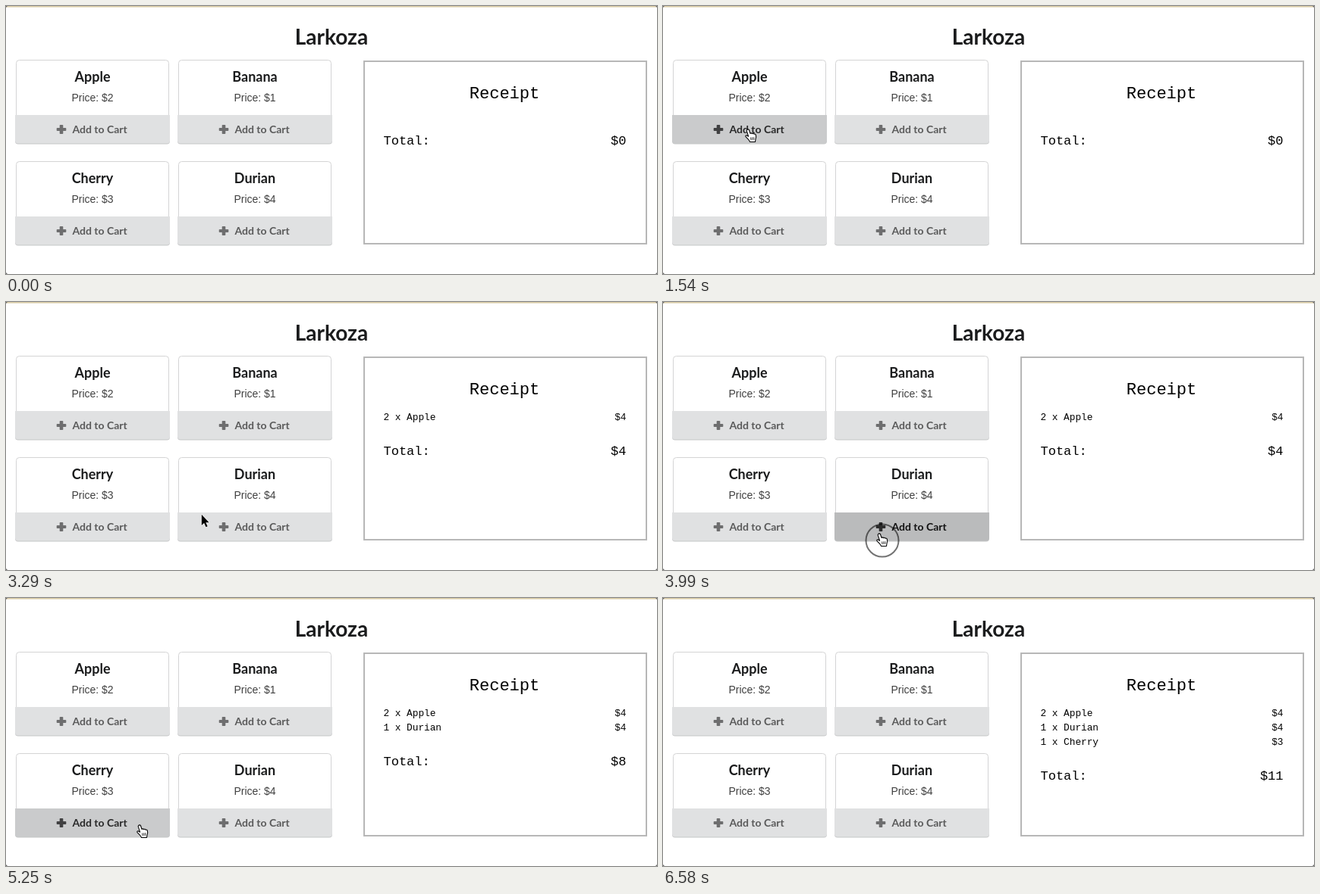
An HTML page for the animation above (6790 ms loop, 858 px wide and 354 px high).

```html
<!DOCTYPE html>
<html lang="en">
<head>
<meta charset="utf-8">
<title>Shopping cart</title>
<style>
  html, body { margin: 0; width: 100%; height: 100%; overflow: hidden; background: #fff; }
  svg { display: block; width: 858px; height: 354px; }
  text { white-space: pre; }
  .mid { text-anchor: middle; }
  .end { text-anchor: end; }
  .title, .name, .label { font-family: Lato, sans-serif; font-weight: 700; }
  .title { font-size: 28px; fill: #1b1c1d; }
  .name { font-size: 18px; fill: #1b1c1d; }
  .label { font-size: 14px; }
  .price { font: 14px "Liberation Sans", Arial, sans-serif; fill: #404040; }
  .receipt { font-family: "Liberation Mono", "Courier New", monospace; fill: #000; }
  .heading { font-size: 22px; }
  .row { font-size: 12.75px; }
  .total { font-size: 17px; }
</style>
</head>
<body>
<svg viewBox="0 0 858 354">
  <rect width="858" height="354" fill="#fff"/>
  <rect width="858" height="1.6" fill="#d9cba6"/>
  <path d="M0 0h2l-2 2zM858 0v2l-2-2zM0 354v-2l2 2zM858 354h-2l2-2z" fill="#666"/>
  <text class="title mid" x="429" y="50.5">Larkoza</text>
  <g id="cards"></g>
  <g class="receipt">
    <rect x="472" y="73" width="372" height="241" fill="#fff" stroke="#b7b7b7" stroke-width="2"/>
    <text class="heading mid" x="657" y="122">Receipt</text>
    <g id="rows"></g>
    <g id="total" class="total">
      <text x="497.5" y="183">Total:</text>
      <text id="sum" class="end" x="817.5" y="183">$0</text>
    </g>
  </g>
  <circle id="ring" r="21.5" fill="none" stroke="#000" stroke-opacity=".55" stroke-width="2"/>
  <g id="cursor" stroke-linejoin="round">
    <path id="arrow" d="M.8.8V15l3.3-3 2.4 5.2 2.2-1L6.3 11.200H10.600Z" fill="#000" stroke="#fff" stroke-width="1.2" paint-order="stroke"/>
    <g id="hand" transform="translate(-4 -1)" stroke="#000" stroke-width="1.1">
      <path fill="#fff" d="M2.600 1.600C3.600.4 5.200.8 5.600 2L7 6.400C7.800 5.600 9 5.700 9.600 6.700C10.400 6 11.600 6.200 12 7.200C13 6.700 14 7.200 14.300 8.200C15 10.500 15 12 14 14L13.500 17.500H6.600C6 15.500 3.500 13 1.200 10.800C.2 9.600 1.200 8.400 2.600 9L4.600 10.200L2.300 3.200C2.100 2.500 2.200 2 2.600 1.600Z"/>
      <path fill="none" stroke-width=".8" d="M7.600 11.500l.4 3.500M9.700 11.300l.2 3.600M11.800 11.200v3.600"/>
    </g>
  </g>
</svg>
<script>
const LOOP = 6790, TICK = 70;
const $ = id => document.getElementById(id);

const goods = [
  { name: 'Apple', price: 2, hover: [[1400, 3150]], press: [[2030, 2170], [2660, 2800]] },
  { name: 'Banana', price: 1, hover: [], press: [] },
  { name: 'Cherry', price: 3, hover: [[4550, 5880]], press: [[5530, 5670]] },
  { name: 'Durian', price: 4, hover: [[3360, 4550]], press: [[3920, 4130]] }
];

// Order in which goods first reach the receipt
const bought = [goods[0], goods[3], goods[2]];

const ease = {
  lin: u => u,
  in: u => u ** 1.3,
  out: u => 1 - (1 - u) ** 1.8,
  both: u => u * u * (3 - 2 * u)
};

// Pointer stops: time, x, y, easing used to get there
const stops = [
  [70, 850, 322, 'lin'],
  [700, 438, 250, 'out'],
  [910, 438, 250, 'lin'],
  [1610, 103, 160, 'both'],
  [1680, 125, 160, 'lin'],
  [1960, 125, 160, 'lin'],
  [2030, 121, 161, 'lin'],
  [3010, 121, 161, 'lin'],
  [3290, 257, 280, 'in'],
  [3500, 285, 306, 'out'],
  [4270, 285, 306, 'lin'],
  [4480, 206, 302, 'in'],
  [4830, 176, 300, 'out'],
  [5740, 176, 300, 'lin'],
  [5880, 208, 323, 'in'],
  [6160, 402, 340, 'both'],
  [6230, 404, 360, 'lin']
];
const handTimes = [[1400, 3150], [3360, 5880]];
const clicks = [[770, 840], ...goods.flatMap(g => g.press)];

const within = (list, t) => list.some(([a, b]) => t >= a && t < b);
const clamp = v => Math.max(0, Math.min(1, v));
const mix = (a, b, u) => a + (b - a) * u;

// Strength of a short fade in and out around each span
const level = (list, t) => Math.max(0, ...list.map(([a, b]) =>
  t < a ? 0 : t < b ? clamp((t - a + 30) / 100) : clamp(1 - (t - b + 30) / 100)));

const base = 'V177.500a4 4 0 0 1-4 4H16a4 4 0 0 1-4-4Z';
$('cards').innerHTML = goods.map((g, i) => `
  <g transform="translate(${i % 2 * 214} ${(i >> 1) * 134})">
    <rect x="13.500" y="71.500" width="201" height="110" rx="4" fill="#fff" stroke="#d4d4d5"/>
    <text class="name mid" x="114" y="99.500">${g.name}</text>
    <text class="price mid" x="114" y="126">Price: $${g.price}</text>
    <path d="M12 144H216${base}" transform="translate(0 1)" fill="#c6c7c8"/>
    <path class="button" d="M12 144H216${base}"/>
    <g class="ink">
      <path d="M71.500 157h3a.8.8 0 0 1 .8.8V161h3.200a.8.8 0 0 1 .8.8v2.400a.8.8 0 0 1-.8.8h-3.200v3.200a.8.8 0 0 1-.8.8h-3a.8.8 0 0 1-.8-.8V165h-3.200a.8.8 0 0 1-.8-.8v-2.400a.8.8 0 0 1 .8-.8h3.200v-3.200a.8.8 0 0 1 .8-.8z" opacity=".85"/>
      <text class="label" x="87.500" y="168">Add to Cart</text>
    </g>
  </g>`).join('');
const buttons = document.querySelectorAll('.button');
const inks = document.querySelectorAll('.ink');

$('rows').innerHTML = bought.map((g, i) => `
  <g class="row">
    <text x="497.500" y="${156 + i * 19}"></text>
    <text class="end" x="817.500" y="${156 + i * 19}"></text>
  </g>`).join('');
const rows = [...$('rows').children];

function drawButtons(t) {
  goods.forEach((g, i) => {
    const h = level(g.hover, t), p = level(g.press, t);
    const tone = mix(mix(224, 202, h), 186, p);
    buttons[i].setAttribute('fill', `rgb(${tone},${tone + 1},${tone + 2})`);
    inks[i].setAttribute('fill-opacity', mix(mix(0.6, 0.8, h), 0.9, p));
  });
}

function drawReceipt(t) {
  let lines = 0, sum = 0;
  bought.forEach((g, i) => {
    const count = g.press.filter(p => t >= p[1]).length;
    const [item, cost] = rows[i].children;
    item.textContent = count ? `${count} x ${g.name}` : '';
    cost.textContent = count ? `$${count * g.price}` : '';
    if (count) lines++;
    sum += count * g.price;
  });
  $('total').setAttribute('transform', `translate(0 ${lines * 19})`);
  $('sum').textContent = `$${sum}`;
}

function pointerAt(t) {
  const i = stops.findIndex(s => s[0] >= t);
  if (i < 1) return stops[0].slice(1, 3);
  const [t0, x0, y0] = stops[i - 1], [t1, x1, y1, kind] = stops[i];
  const u = ease[kind]((t - t0) / (t1 - t0));
  return [mix(x0, x1, u), mix(y0, y1, u)];
}

function drawPointer(t) {
  const seen = t >= 70 && t <= 6230;
  const hand = within(handTimes, t);
  const ring = within(clicks, t);
  $('cursor').style.display = seen ? '' : 'none';
  $('ring').style.display = ring ? '' : 'none';
  if (!seen) return;
  const [x, y] = pointerAt(t).map(Math.round);
  $('cursor').setAttribute('transform', `translate(${x} ${y})`);
  $('arrow').style.display = hand ? 'none' : '';
  $('hand').style.display = hand ? '' : 'none';
  $('ring').setAttribute('cx', x + (hand ? 4 : 0));
  $('ring').setAttribute('cy', y + (hand ? 9 : 1));
}

function draw(ms) {
  const t = Math.floor(ms % LOOP / TICK) * TICK;
  drawButtons(t);
  drawReceipt(t);
  drawPointer(t);
}

const start = performance.now();
function loop() {
  draw(performance.now() - start);
  requestAnimationFrame(loop);
}
loop();
</script>
</body>
</html>
```
